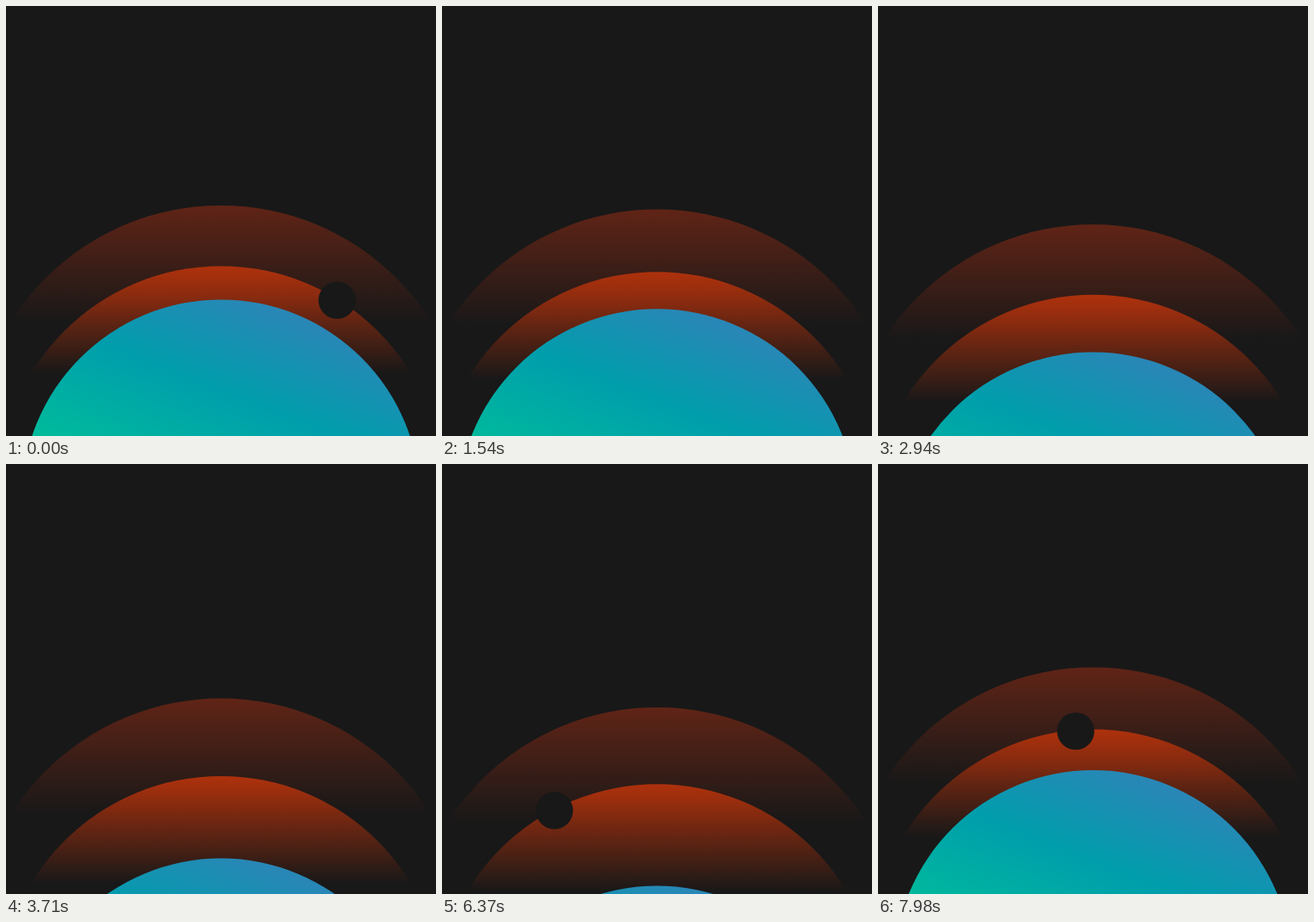
Animation, 500 px wide and 500 px high, one loop 8000 ms. Source, as an HTML page with a canvas:

```html
<!DOCTYPE html>
<html lang="en">
<head>
<meta charset="utf-8">
<title>Planet and moon</title>
<style>
  html, body { margin: 0; width: 100%; height: 100%; overflow: hidden; background: #181818; }
  canvas { display: block; width: 100vmin; height: 100vmin; }
</style>
</head>
<body>
<canvas id="stage" width="500" height="500"></canvas>
<script>
const ctx = document.getElementById('stage').getContext('2d');
const LOOP = 8000, STEP = 70, BG = '#181818', CX = 250;
const RISE_START = 5250;

// cubic Bezier easing with flat ends
function easing(x1, x2) {
  return u => {
    if (u <= 0 || u >= 1) return u <= 0 ? 0 : 1;
    let lo = 0, hi = 1;
    for (let i = 0; i < 30; i++) {
      const s = (lo + hi) / 2, v = 1 - s;
      if (3 * s * v * v * x1 + 3 * s * s * v * x2 + s * s * s < u) lo = s;
      else hi = s;
    }
    return lo * lo * (3 - 2 * lo);
  };
}

const fallEase = easing(0.7, 0.65);
const riseEase = easing(0.55, 0.5);

// top: resting upper edge; drop: how far the disc sinks
const halo = { r: 288.5, top: 231.9, drop: 61, fall: [0, 5250], riseEnd: 8700, ease: riseEase };
const glow = { r: 257.5, top: 302.4, drop: 83.5, fall: [0, 5060], riseEnd: 8700, ease: riseEase };
const planet = { r: 231.5, top: 341.4, drop: 182.5, fall: [190, 5250], riseEnd: 8600, ease: easing(0.5, 0.6) };
const moon = { r: 21.7, orbit: 256.2 };

function topAt(t, d) {
  const [from, to] = d.fall;
  const down = fallEase((t - from) / (to - from));
  const up = d.ease((t - RISE_START) / (d.riseEnd - RISE_START));
  return d.top + d.drop * (down - up);
}

// degrees clockwise from the top of the glow
function moonAngle(t) {
  return t < 3000 ? 31.8 + 0.0145 * t + 1e-5 * t * t
                  : -51 + 0.01444 * (t - 4760);
}

function disc(x, y, r, fill) {
  ctx.fillStyle = fill;
  ctx.beginPath();
  ctx.arc(x, y, r, 0, Math.PI * 2);
  ctx.fill();
}

function drawFading(t, d, rgb, depth) {
  const top = topAt(t, d);
  const g = ctx.createLinearGradient(0, top, 0, top + depth);
  g.addColorStop(0, `rgba(${rgb},1)`);
  g.addColorStop(1, `rgba(${rgb},0)`);
  disc(CX, top + d.r, d.r, g);
}

function drawPlanet(t) {
  const cy = topAt(t, planet) + planet.r;
  const dx = 0.364, dy = -0.931, from = -10, to = 225;
  const g = ctx.createLinearGradient(CX + dx * from, cy + dy * from, CX + dx * to, cy + dy * to);
  g.addColorStop(0, '#00bb9b');
  g.addColorStop(0.54, '#009eac');
  g.addColorStop(1, '#2887b6');
  disc(CX, cy, planet.r, g);
}

function drawMoon(t) {
  const a = moonAngle(t) * Math.PI / 180;
  const cy = topAt(t, glow) + glow.r;
  disc(CX + moon.orbit * Math.sin(a), cy - moon.orbit * Math.cos(a), moon.r, BG);
}

function draw(t) {
  ctx.fillStyle = BG;
  ctx.fillRect(0, 0, 500, 500);
  drawFading(t, halo, '96,36,22', 135);
  drawFading(t, glow, '174,49,12', 125);
  drawPlanet(t);
  drawMoon(t);
}

const start = performance.now();
function tick() {
  const t = (performance.now() - start) % LOOP;
  draw(Math.floor(t / STEP) * STEP);
  requestAnimationFrame(tick);
}
tick();
</script>
</body>
</html>
```
